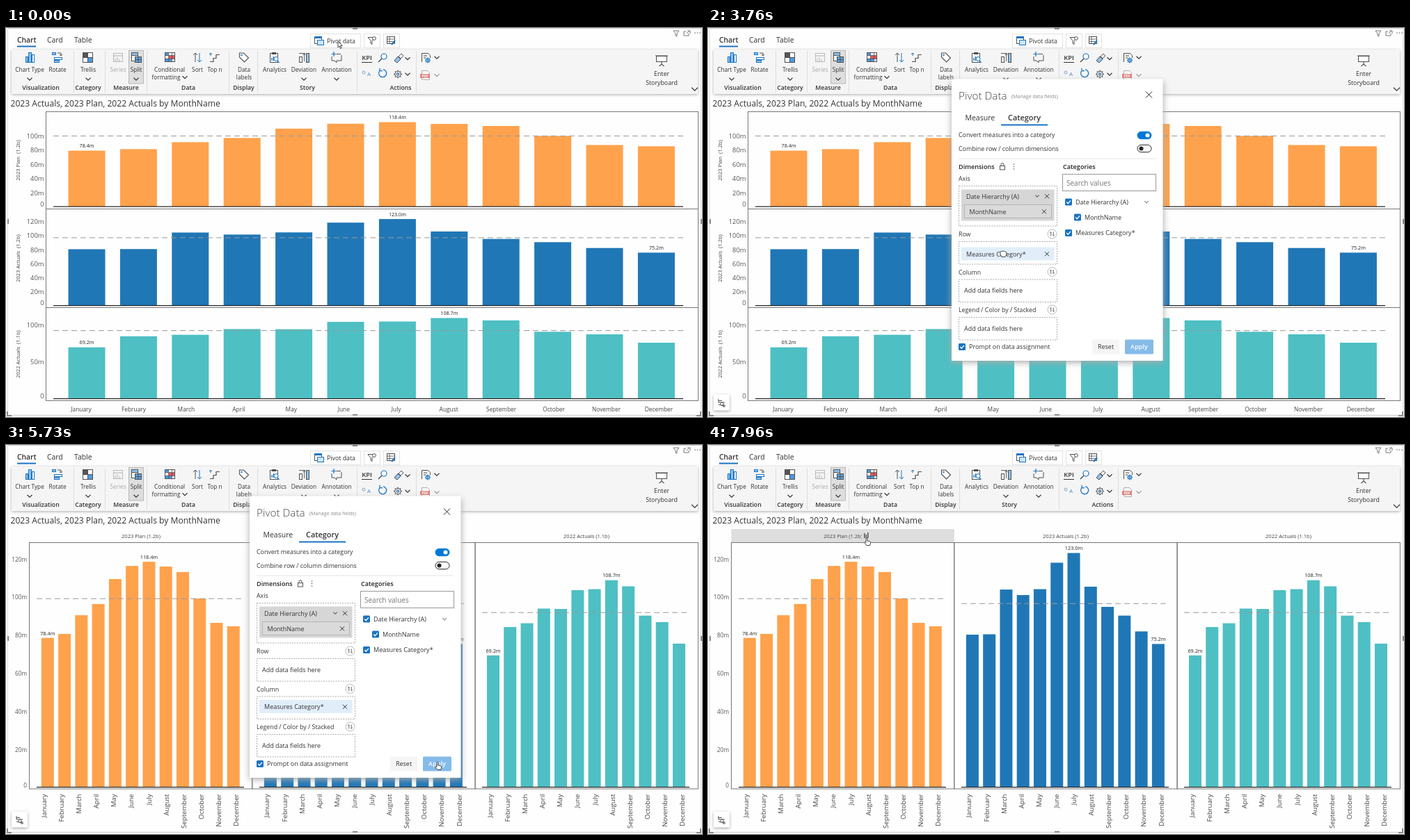
An HTML page with a canvas that plays this animation: 1000x560 px, repeating every 8 s.

```html
<!DOCTYPE html>
<html lang="en">
<head>
<meta charset="utf-8">
<title>Pivot data</title>
<style>
html, body { margin: 0; width: 100%; height: 100%; overflow: hidden; background: #fefefe }
canvas { display: block }
</style>
</head>
<body>
<canvas id="stage" width="1000" height="560"></canvas>
<script>
const g = document.getElementById('stage').getContext('2d');
const INK = '#333', LINE = '#505050', GRAY = '#8a8a8a', BLUE = '#1a73c2', PALE = '#85bbe9', LOOP = 8000;
const MONTHS = ['January', 'February', 'March', 'April', 'May', 'June', 'July',
  'August', 'September', 'October', 'November', 'December'];
const SERIES = [
  { name: '2023 Plan', sum: '(1.2b)', color: '#ffa24d', top: 120.5, base: 257, scale: 1.026, marks: [0, 6],
    ticks: [100, 80, 60, 40, 20], nameY: 190.5,
    data: [78.4, 80.5, 90.3, 96.2, 109.3, 116.2, 118.4, 115.9, 113, 99.1, 86.3, 84.5] },
  { name: '2023 Actuals', sum: '(1.2b)', color: '#2077b6', top: 260.5, base: 399.5, scale: 1.012, marks: [6, 11],
    ticks: [120, 100, 80, 60, 40, 20], nameY: 331.5,
    data: [80.1, 80.3, 103.8, 100.9, 104, 117.9, 123, 105.3, 94.7, 90.1, 81.8, 75.2] },
  { name: '2022 Actuals', sum: '(1.1b)', color: '#4ebfc3', top: 402.5, base: 533.5, scale: 1.067, marks: [0, 7],
    ticks: [100, 50], nameY: 469.5,
    data: [69.2, 84.1, 86.1, 93.8, 93.6, 103.5, 104, 108.7, 105.5, 90.1, 86.7, 75.4] }
];
// Cursor moves: start, end, destination
const MOVES = [[1130, 1930, 460, 135], [2630, 3000, 424, 321], [3700, 4160, 424, 383],
  [4360, 5000, 621, 462], [6260, 6830, 635, 99], [7330, 7960, 229, 139]];

// y is the middle of the capitals
function text(s, x, y, size = 9, color = INK, align = 'left', weight = 400) {
  g.font = `${weight} ${size}px "Open Sans", "Noto Sans", sans-serif`;
  g.textAlign = align;
  g.fillStyle = color;
  g.fillText(s, x, y + size * .36);
}
const mid = (s, x, y, size, color, weight) => text(s, x, y, size, color, 'center', weight);
function upright(s, x, y, size, color, align) {
  g.save();
  g.translate(x, y);
  g.rotate(-Math.PI / 2);
  text(s, 0, 0, size, color, align);
  g.restore();
}
function rect(x, y, w, h, fill, stroke, dash = []) {
  if (fill) { g.fillStyle = fill; g.fillRect(x, y, w, h); }
  if (stroke) {
    g.lineWidth = 1; g.strokeStyle = stroke; g.setLineDash(dash);
    g.strokeRect(x, y, w, h); g.setLineDash([]);
  }
}
function path(d, stroke, width = 1, fill) {
  const p = new Path2D(d);
  if (fill) { g.fillStyle = fill; g.fill(p); }
  if (stroke) { g.strokeStyle = stroke; g.lineWidth = width; g.stroke(p); }
}
function circle(x, y, r, stroke, fill, width = 1) {
  g.beginPath(); g.arc(x, y, r, 0, 7);
  if (fill) { g.fillStyle = fill; g.fill(); }
  if (stroke) { g.strokeStyle = stroke; g.lineWidth = width; g.stroke(); }
}
const chevron = (x, y, c = INK, r = 3.5) => path(`M${x - r} ${y - r / 2}l${r} ${r} ${r} ${-r}`, c, 1.1);
const cross = (x, y, r = 3, c = '#555') => path(`M${x - r} ${y - r}l${2 * r} ${2 * r}m0 ${-2 * r}l${-2 * r} ${2 * r}`, c, 1);
function shadowed(blur, draw, dy = 1) {
  g.save();
  g.shadowColor = '#aaa'; g.shadowBlur = blur; g.shadowOffsetY = dy;
  draw();
  g.restore();
}
function gear(x, y, r, c) {
  circle(x, y, r, c); circle(x, y, r * .4, c);
  for (let i = 0; i < 8; i++) {
    const a = i * Math.PI / 4, u = Math.cos(a), v = Math.sin(a);
    path(`M${x + u * r} ${y + v * r}L${x + u * (r + 1.6)} ${y + v * (r + 1.6)}`, c, 1.4);
  }
}

function icons() {
  rect(28.5, 41.5, 3, 8, '#8fc1ec', BLUE); rect(32.5, 35.5, 4, 14, '#8fc1ec', BLUE); rect(37.5, 38.5, 3, 11, '#fff', BLUE);
  rect(66.5, 35.5, 5, 3, '#8fc1ec', BLUE); rect(69.5, 42.5, 11, 3, '#fff', BLUE); rect(69.5, 46.5, 7, 3, '#8fc1ec', BLUE);
  path('M74 36h5v4m-2-2l2 2 2-2', LINE);
  rect(110.5, 35.5, 14, 14, '#fff', LINE); rect(111, 36, 6, 6, '#555'); rect(118, 43, 6, 6, '#4a9be0');
  path('M117.5 35v15M110 42.5h15', LINE);
  rect(154.5, 36.5, 13, 12, '#f4f4f4', '#bbb'); path('M154 40h13M157 48v-4m3 4v-6m3 6v-3', '#b5b5b5');
  rect(176.5, 32.5, 21, 47.5, '#dedede', '#b8b8b8');
  rect(180.5, 35.5, 9, 4, '#8fc1ec', LINE); rect(180.5, 39.5, 9, 8, '#fff', LINE); rect(185.5, 41.5, 9, 8, '#59a4e3', LINE);
  path('M190 42v8M185 45.5h10', LINE);
  rect(228.5, 35.5, 14, 13, '#fff', LINE); rect(229, 36, 4, 4, '#4a9be0'); rect(234, 40, 8, 4, '#e0555a'); rect(229, 44, 9, 4, '#4a9be0');
  path('M233.5 35v14M238.5 35v14M228 39.5h15M228 44.5h15', LINE, .8);
  path('M272 49V36m-3 3l3-3 3 3', LINE); path('M278 36v13m-3-3l3 3 3-3', BLUE);
  path('M293 48.5h5v-5h4v-5h5', LINE, 1.2); path('M294 40v-4m-2 2l2-2 2 2', BLUE);
  path('M335.5 36h6l7 7-6 6-7-7Z', LINE, 1.1, '#fff'); circle(338.5, 39, 1, BLUE);
  rect(379.5, 36.5, 11, 13, '#fff', LINE); rect(382, 35, 6, 3, LINE); path('M382 47v-4m2.5 4v-6', BLUE, 1.4);
  circle(388, 44.5, 3, BLUE, '#fff'); path('M390 47l2.5 3', BLUE, 1.3);
  rect(421.5, 41.5, 4, 8, '#fff', LINE); rect(431.5, 36.5, 4, 13, '#8fc1ec', LINE);
  path('M421 36.5h9M428.5 37v11m-2-9l2-2 2 2', LINE, .9);
  path('M468 41v6h4l3 3v-3h7v-8', LINE); path('M471 34v7m-3.5-3.5h7', BLUE, 1.2); path('M475 37.5h6', LINE);
  mid('KPI', 518.5, 43, 9.4, INK, 600); rect(511, 49, 15, 1, INK);
  circle(543, 41, 4, BLUE, '#fff', 1.2); path('M540 44l-5 5', LINE, 1.4);
  path('M558 47l5-6 4 4-5 5Z', LINE, 1, '#8fc1ec'); path('M564 41l4-4 3 3-4 4Z', LINE, 1, '#fff'); chevron(577, 44);
  circle(514, 64, 2, '#7aa7d2'); mid('A', 521.5, 66, 8, '#4a86bd');
  path('M537 61.5a5.5 5.5 0 1 0 5-1.8m-5-2v4h4', BLUE, 1.3);
  gear(563, 66.5, 4.2, LINE); circle(563, 66.5, 1.6, BLUE); chevron(577, 66.5);
  path('M597.5 49V36.5h9l3 3V43M600 40h5m-5 3h3', LINE); gear(606, 46.5, 2.3, BLUE); chevron(619, 42.5);
  path('M597.5 74V61.5h8l3 3v10Z', '#aaa', 1, '#fff'); rect(595, 66, 14, 6, '#dd8583');
  mid('PDF', 602, 69, 4.6, '#fff', 700); chevron(619, 68, '#999');
  rect(934.5, 40.5, 15, 8, '#fff', LINE); path('M933 40h18M942 49v3m-3.5 3l3.5-3 3.5 3', LINE, 1.1);
  mid('Enter', 942, 65.5, 8.8); mid('Storyboard', 942, 78.5, 8.8);
  chevron(989.5, 88, INK, 4.5);
}

function toolbar() {
  shadowed(4, () => rect(8, 31, 986, 64, '#f5f5f5'));
  text('Chart', 16, 17.5, 10.3, INK, 'left', 600);
  text('Card', 59, 17.5, 10.4); text('Table', 98, 17.5, 10.4);
  rect(16, 25.5, 27, 2, BLUE);
  for (const [x, w] of [[437.5, 72], [514.5, 23], [542.5, 23]]) rect(x, 8.5, w, 20, '#fff', '#e2e2e2');
  rect(443.5, 12.5, 10, 10, '#fff', LINE); rect(443, 12, 11, 3, BLUE); rect(447.5, 17.5, 9, 7, '#cfe4f7', BLUE);
  text('Pivot data', 461, 19, 8.8);
  path('M520 13.5h10l-4 5v5l-2-1.5v-3.5Z', LINE); circle(529, 15, 2.4, LINE, '#fff');
  rect(547.5, 12.5, 11, 10, '#fff', LINE); path('M547 16h12M547 19.5h12M551 13v10', LINE, .8); path('M554 24l5-6', BLUE, 2);
  path('M959 4h8l-3 4v4l-2-1v-3Z', '#777'); path('M981 8v3h-7V5h3m2-1h4v4m-5 0l4-4', '#777');
  for (const x of [990, 993.5, 997]) circle(x, 7, .8, null, '#666');
  for (const x of [97.5, 142.5, 202.5, 320.5, 361.5, 504.5, 589.5]) rect(x - .5, 33, 1, 60, '#dcdcdc');
  icons();
  const items = { 'Chart Type': 34, Rotate: 74, Trellis: 118, Series: 161, Split: 187, Conditional: 235, Sort: 275,
    'Top n': 300, Data: 342, Analytics: 386, Deviation: 428, Annotation: 475 };
  for (const s in items) mid(s, items[s], 60.5, 8.25, s == 'Series' ? '#aaa' : INK);
  mid('formatting', 230, 71.5, 8.25); chevron(257, 71);
  mid('labels', 342, 71.5, 8.25);
  for (const x of [34, 118, 187, 428, 475]) chevron(x, 73.5);
  const groups = { Visualization: 50, Category: 118, Measure: 172.5, Data: 262, Display: 341.5, Story: 433, Actions: 567 };
  for (const s in groups) mid(s, groups[s], 86, 8.7, INK, 600);
}

function frame(badge) {
  rect(0, 0, 1000, 560, '#fefefe');
  rect(2, 0, 996, 1, '#ccc'); rect(2, 557, 996, 1, '#c8c8c8'); rect(2, 0, 1, 558, '#ddd'); rect(998, 0, 1, 558, '#ddd');
  for (const y of [0, 556]) rect(498, y, 7, 2, '#888');
  for (const x of [2, 998]) rect(x, 275, 2, 7, '#888');
  path('M2 552v6h6M992 558h6v-6', '#888', 2);
  if (!badge) return;
  shadowed(4, () => rect(8, 527.5, 23, 23, '#fff'));
  path('M15 534v5h9m-9-2.5h5M15 542l8 2', LINE); circle(20, 541, 2.2, '#666'); circle(23, 544, 1.4, LINE);
}

const mean = a => a.reduce((s, v) => s + v) / a.length;
function bars(s, x, pitch, w, base, scale, from, to, size) {
  s.data.forEach((v, i) => rect(x + i * pitch, base - v * scale, w, v * scale, s.color));
  for (const i of s.marks)
    mid(s.data[i].toFixed(1) + 'm', x + i * pitch + w / 2, base - s.data[i] * scale - 6.8, size, '#222');
  const y = base - mean(s.data) * scale;
  g.setLineDash([8, 5]); path(`M${from} ${y}H${to}`, '#999'); g.setLineDash([]);
  rect(from, base - .5, to - from, 1.2, '#222');
}

function rows() {
  for (const s of SERIES) {
    bars(s, 89.5, 74.4, 53, s.base, s.scale, 68, 973, 7.2);
    for (const v of s.ticks) text(v + 'm', 54.5, s.base + .8 - v * s.scale, 9.4, '#555', 'right');
    text('0', 54.5, s.base - 3.5, 9.4, '#555', 'right');
    upright(`${s.name}  ${s.sum}`, 17, s.nameY, 7.6, '#444', 'center');
    path(`M57 ${s.top}H994.5`, '#777');
  }
  rect(57.5, 120.5, 937, 416, null, '#777');
  MONTHS.forEach((m, i) => mid(m, 108 + i * 75.45, 548.5, 8.4, '#444'));
}

function columns(hover) {
  SERIES.forEach((s, p) => {
    const x = 33.5 + p * 320.3;
    if (p == hover) rect(x, 121, 320.3, 20, '#dedede');
    mid(`${s.name} ${s.sum}`, 194 + p * 320, 131, 7.5, '#444');
    if (p == hover) {
      const ix = 222 + p * 320;
      rect(ix - 1, 124, 12, 14, '#dedede');
      rect(ix + 2, 127, 1.5, 7, '#555'); rect(ix + 4.5, 129, 1.5, 5, '#555'); rect(ix + 7, 126, 1.5, 8, '#555');
    }
    bars(s, 50.8 + p * 320.1, 24.27, 18, 492.5, 2.74, 44 + p * 320, 342 + p * 320, 7.3);
    rect(x, 140.5, 320.3, 354.5, null, '#777');
    MONTHS.forEach((m, i) => upright(m, 54.5 + p * 320.5 + i * 25.1, 502.5, 9.6, '#444', 'right'));
  });
  for (let v = 20; v <= 120; v += 20) text(v + 'm', 30, 493.5 - v * 2.74, 8.2, '#555', 'right');
  text('0', 30, 490, 8.2, '#555', 'right');
}

function toggle(y, on, c) {
  g.beginPath(); g.roundRect(617, y - 5.2, 20, 10.4, 5.2);
  g.fillStyle = on ? c : '#fff'; g.fill();
  g.strokeStyle = c; g.lineWidth = 1; g.stroke();
  circle(on ? 631.5 : 622.5, y, 3, null, on ? '#fff' : c);
}
function check(x, y, c, s, ink) {
  g.beginPath(); g.roundRect(x - 5, y - 5, 10, 10, 1.5); g.fillStyle = c; g.fill();
  path(`M${x - 2.8} ${y}l2 2.2 3.8-4.4`, '#fff', 1.3);
  text(s, x + 10, y, 9, ink);
}
function chip(x, y, w, h, fill, s, ink, stroke) {
  rect(x, y, w, h, fill, stroke);
  text(s, x + 7, y + 9.8, 9, ink);
  cross(x + w - 10.5, y + 9.8, 3, ink);
}
function slot(y, w, h, s, ink) {
  rect(360.5, y, w, h, null, '#aaa', [2, 1.5]);
  if (s) text(s, 368, y + h / 2, 9, ink);
}
function lock(x, c) {
  rect(x - 3.5, 198.5, 7, 5.5, null, c); path(`M${x - 2} 198v-1.5a2 2 0 0 1 4 0v1.5`, c);
  for (const y of [196, 199.5, 203]) circle(x + 16.5, y, .8, null, c);
}
const EMPTY = 'Add data fields here';

function measureTab() {
  text('Enforce IBCS standards', 360, 154, 8.9); toggle(154.5, false, '#222');
  text('Split categories into measures', 360, 173.5, 8.9); toggle(173.5, false, '#aaa');
  text('Measures', 360, 199.5, 9.1, '#666', 'left', 600); lock(413, '#999');
  text('Values', 510, 199.5, 9.1, '#555', 'left', 600);
  text('Actual(s)', 360, 217.5, 9, GRAY);
  rect(397, 212, 25, 12, '#e8f1fa'); text('Default', 398.5, 218, 6.4, '#6d8fae');
  slot(227.5, 137, 74.5);
  SERIES.forEach((_, i) => {
    const s = SERIES[[1, 0, 2][i]].name;
    chip(364, 232.5 + i * 21.6, 129, 18.8, '#ebebeb', s, '#808080');
    check(518, 252.5 + i * 30.5, '#7fb4e6', s, '#777');
    const y = 314 + i * 50.4;
    text(`Comparison ${i + 1} (vs Actuals)`, 360, y, 8.9, GRAY);
    slot(y + 10, 137, 29, EMPTY, GRAY);
  });
}

function categoryTab(t, y) {
  text('Convert measures into a category', 360, 154, 8.85); toggle(154.5, true, '#0078d4');
  text('Combine row / column dimensions', 360, 173.5, 8.85); toggle(173.5, false, '#222');
  text('Dimensions', 360, 199.5, 9.1, '#222', 'left', 600); lock(423, '#555');
  text('Categories', 510, 199.5, 9.1, '#222', 'left', 600);
  text('Axis', 360, 217, 8.8);
  slot(227.5, 141, 57.5);
  chip(364, 232.5, 133.5, 45, '#d6d6d6', 'Date Hierarchy (A)', INK); chevron(473, 242, '#555', 2.6);
  chip(368.5, 254.5, 125, 19, '#dadada', 'MonthName', INK, '#b4b4b4');
  const dropped = t >= 4160;
  [['Row', 297, dropped], ['Column', 351.5, !dropped], ['Legend / Color by / Stacked', 406, true]].forEach(([s, sy, free]) => {
    text(s, 360, sy, 8.8);
    circle(494.5, sy - .5, 6.5, '#bbb', '#fff');
    path(`M492.8 ${sy + 2.5}v-6l-1.6 1.8M496.2 ${sy - 3.5}v6l1.6-1.8`, '#555', .9);
    slot(sy + 10.5, 141, 32.5, free ? EMPTY : '', INK);
  });
  const cy = dropped ? 367 : t < 3700 ? 312.5 : 312.5 + y - 321;
  chip(364, cy, 133.5, 19, '#e1eefa', 'Measures Category*', INK);
  check(518, 250.5, BLUE, 'Date Hierarchy (A)'); chevron(630, 250.5, '#888', 2.8);
  check(531, 272.5, BLUE, 'MonthName');
  check(518, 295, BLUE, 'Measures Category*');
}

function dialog(t, y) {
  const category = t >= 2230, bottom = category ? 479 : 485, by = bottom - 20;
  shadowed(9, () => rect(350, 73.5, 303.5, bottom - 73.5, '#fff'), 3);
  text('Pivot Data', 360, 97.5, 15.3, '#444', 'left', 300);
  text('(Manage data fields)', 436, 98, 7.1, GRAY);
  cross(633.5, 96, 4.5, '#222');
  const hover = t < 2630 ? Math.max(0, Math.min(1, (t - 1930) / 100)) : 0;
  if (hover) rect(421, 117, 67, 23, `rgba(225,225,225,${hover * .8})`);
  rect(360, 187.5, 283, 1, '#e4e4e4');
  text('Measure', 369.5, 129, 10.5, INK, 'left', category ? 400 : 600);
  mid('Category', category ? 454.5 : 455.5, 129, category ? 10.9 : 10.7, INK, category ? 600 : 400);
  rect(category ? 421 : 360, 138.5, category ? 67 : 64, 2, BLUE);
  rect(509.5, 210.5, 134, 24, '#fff', category ? '#999' : '#ccc');
  text('Search values', 515, 223.5, 10, category ? '#777' : '#999');
  if (category) categoryTab(t, y); else measureTab();
  check(365, by, BLUE, 'Prompt on data assignment');
  rect(552, by - 10.5, 39, 21, '#f5f5f5'); mid('Reset', 571.5, by, 9, category ? INK : '#777');
  g.beginPath(); g.roundRect(599, by - 10.5, 41, 21, 1.5);
  g.fillStyle = t >= 4360 && t < 5300 ? '#0078d4' : PALE; g.fill();
  mid('Apply', 619.5, by, 9.1, '#fff', 600);
}

function cursorAt(t) {
  let x = 478, y = 25;
  for (const [from, to, nx, ny] of MOVES) {
    const k = Math.max(0, Math.min(1, (t - from) / (to - from))), e = k * k * (3 - 2 * k);
    x += (nx - x) * e; y += (ny - y) * e;
  }
  return [x, y];
}
function cursor(t, x, y) {
  g.save();
  g.translate(x, y);
  g.lineJoin = 'round';
  if (t < 500) path('M-1-6V3l2-2 1.5 3.5 1.5-.7L2.5.5H5.2Z', '#333', .9, '#fff');
  else if (t >= 3230 && t < 4160)
    path('M-4-1c0-2 2-2 2.5-1 .5-1.4 2-1.2 2.4 0 .6-1 2-.8 2.2.4 1-.4 1.6.2 1.6 1.2V2.5L3 5.5H-2L-4 2Z', '#333', .9, '#fff');
  else
    path('M-2-4.5c0-1.4 1.9-1.4 1.9 0V-1l3.4.8c1.1.3 1.4 1 1.2 2.2L3.8 5.5H-1.2L-4.2 1.8c-.5-.9.5-1.6 1.3-1l.9.7Z', '#333', .9, '#fff');
  g.restore();
}

function draw() {
  const t = performance.now() % LOOP, [x, y] = cursorAt(t);
  frame(t >= 60);
  toolbar();
  text('2023 Actuals, 2023 Plan, 2022 Actuals by MonthName', 6.5, 108.5, 12.1);
  const tip = y - 5.5;
  if (t < 5730) rows();
  else columns(t >= 7330 && tip > 121 && tip < 141 ? Math.floor((x - 33.5) / 320.3) : -1);
  if (t >= 730 && t < 7060) {
    g.globalAlpha = t < 760 ? .6 : 1;
    dialog(t, y);
    g.globalAlpha = 1;
  }
  cursor(t, x, y);
  requestAnimationFrame(draw);
}
draw();
</script>
</body>
</html>
```
